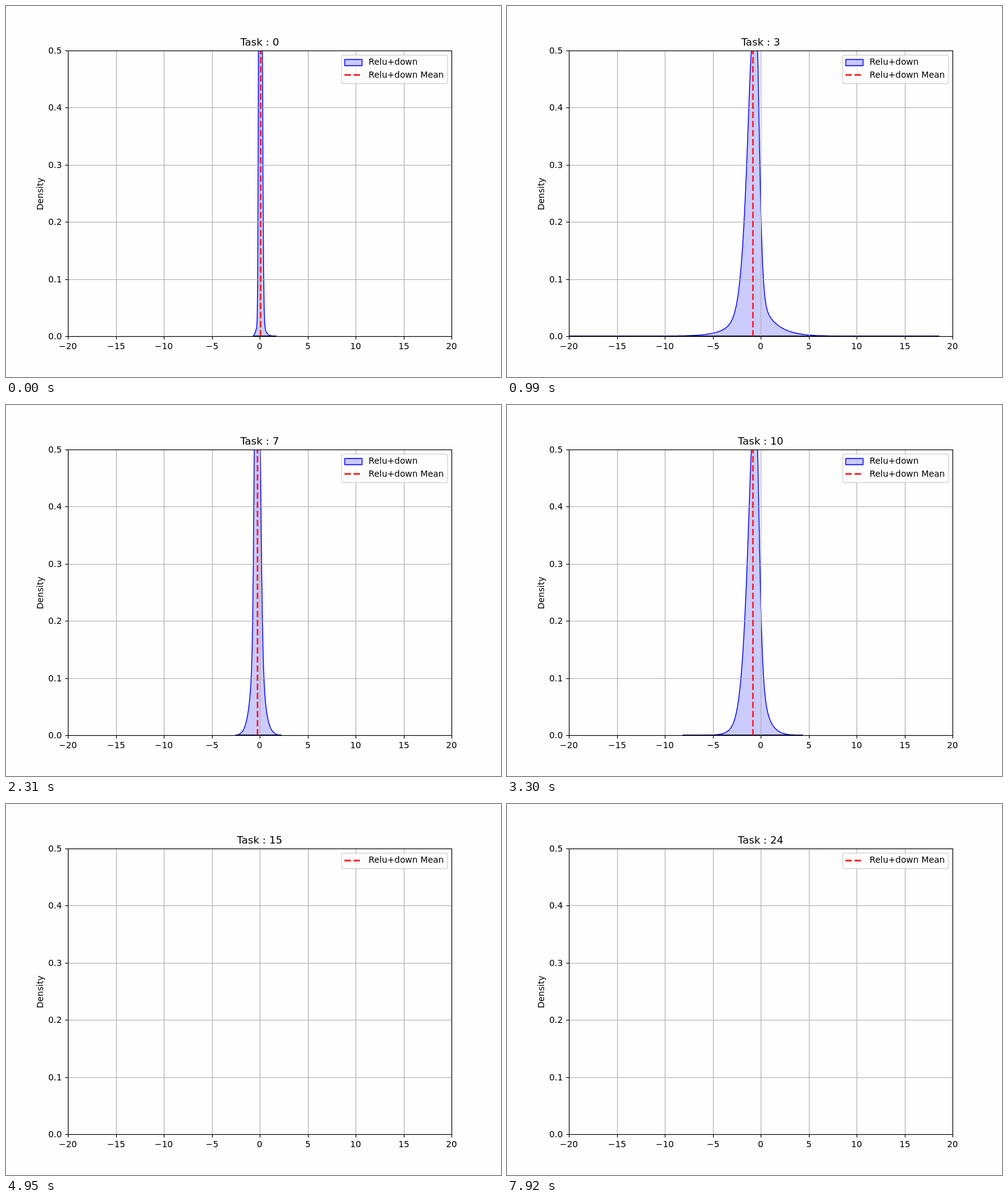
These frames come from a looping animation (800x600 px, 8000 ms). An HTML page with a canvas:

```html
<!DOCTYPE html>
<html lang="en">
<head>
<meta charset="utf-8">
<title>Density by task</title>
<style>
  html, body { margin: 0; width: 100%; height: 100%; overflow: hidden; background: #fefefe; }
  canvas { display: block; }
</style>
</head>
<body>
<canvas id="chart" width="800" height="600"></canvas>
<script>
const ctx = document.getElementById('chart').getContext('2d');
const LOOP = 8000, STEP = 330;
const LEFT = 100, RIGHT = 720, TOP = 72, BOTTOM = 534;
const THIN = 1.11, EDGE = 1.39, THICK = 2.78;
const BLUE = '#00f', FILL = 'rgba(0,0,255,.2)', RED = 'rgba(255,0,0,.8)';

// Mean and horizontal extent of each distribution; later tasks have none.
const tasks = [
  [411.5, 399, 437], [401.5, 90, 730], [404.5, 340, 456], [397.5, 90, 698], [403.5, 340, 456],
  [404.5, 335, 442], [405.5, 351, 443], [406.5, 371, 445], [402.5, 325, 455], [400.5, 313, 460],
  [397.5, 284, 478], [404.5, 350, 444], [406.5, 345, 445], [403.5, 339, 458], [405.5, 355, 446]
];

// One side of the bell, from where it leaves the top edge out to its far end:
// a compact core plus an exponential tail.
function flank(cross, end, core, tail, share) {
  const count = 60, span = Math.abs(end - cross);
  return Array.from({ length: count + 1 }, (_, i) => {
    const part = (i / count) ** 2, d = span * part;
    const bell = (1 - share) * Math.exp(-((d / core) ** 1.4)) + share * Math.exp(-d / tail);
    return [cross + (end - cross) * part, BOTTOM - (BOTTOM - TOP) * bell * (1 - part ** 2)];
  });
}

// The further the mean lies below zero, the wider and more skewed the bell.
function outline([mean, start, end]) {
  const shift = 411 - mean;
  const crossL = 407.2 - 1.5 * shift + .044 * shift ** 2;
  const crossR = 414 - .67 * shift;
  const tail = .5 * (end - start) ** .6;
  const share = Math.min(3.7 / tail, .1 + .07 * shift);
  return [
    ...flank(crossL, start, .8 + .06 * shift ** 2, tail, share).reverse(),
    [crossL, TOP - 20], [crossR, TOP - 20],
    ...flank(crossR, end, 1.6 + .28 * shift, tail, share)
  ];
}

function line(x1, y1, x2, y2, color, width, dash = []) {
  ctx.strokeStyle = color;
  ctx.lineWidth = width;
  ctx.setLineDash(dash);
  ctx.beginPath();
  ctx.moveTo(x1, y1);
  ctx.lineTo(x2, y2);
  ctx.stroke();
  ctx.setLineDash([]);
}

const redLine = (x1, y1, x2, y2) => line(x1, y1, x2, y2, RED, THICK, [10.28, 4.44]);

function label(text, x, y, align = 'center', size = 13.89) {
  ctx.font = `${size}px "DejaVu Sans", sans-serif`;
  ctx.textAlign = align;
  ctx.fillStyle = '#000';
  ctx.fillText(text, x, y);
}

function paint(fill, stroke, width) {
  ctx.fillStyle = fill;
  ctx.fill();
  ctx.strokeStyle = stroke;
  ctx.lineWidth = width;
  ctx.stroke();
}

const columns = Array.from({ length: 9 }, (_, i) => ({
  x: Math.round(LEFT + i * 77.5) + .5,
  text: String(i * 5 - 20).replace('-', '\u2212')
}));
const rows = Array.from({ length: 6 }, (_, i) => ({
  y: Math.round(BOTTOM - i * 92.4) + .5,
  text: (i / 10).toFixed(1)
}));

function drawBell(task) {
  const [, start, end] = task;
  ctx.beginPath();
  for (const [x, y] of outline(task)) ctx.lineTo(x, y);
  ctx.closePath();
  ctx.lineJoin = 'round';
  paint(FILL, BLUE, EDGE);
  ctx.lineJoin = 'miter';
  line(start, BOTTOM - .5, end, BOTTOM - .5, 'rgba(0,0,40,.8)', 1);
}

function drawLegend(hasData) {
  const meanY = hasData ? 111.5 : 91.5;
  ctx.beginPath();
  ctx.roundRect(542.5, 79.5, 171, hasData ? 46 : 25, 2.78);
  paint('rgba(254,254,254,.8)', 'rgba(204,204,204,.8)', EDGE);
  if (hasData) {
    ctx.beginPath();
    ctx.rect(547.5, 86.5, 28, 10);
    paint(FILL, BLUE, EDGE);
    label('Relu+down', 586, 95, 'left');
  }
  redLine(547, meanY, 575, meanY);
  label('Relu+down Mean', 586, hasData ? 116 : 95, 'left');
}

function draw(index) {
  const task = tasks[index];
  ctx.fillStyle = '#fefefe';
  ctx.fillRect(0, 0, 800, 600);

  ctx.save();
  ctx.beginPath();
  ctx.rect(LEFT, TOP, RIGHT - LEFT, BOTTOM - TOP);
  ctx.clip();
  if (task) drawBell(task);
  for (const { x } of columns) line(x, TOP, x, BOTTOM, '#b0b0b0', THIN);
  for (const { y } of rows) line(LEFT, y, RIGHT, y, '#b0b0b0', THIN);
  if (task) redLine(task[0], BOTTOM + .5, task[0], TOP);
  ctx.restore();

  for (const { x, text } of columns) {
    line(x, BOTTOM + .5, x, BOTTOM + 5.4, '#000', THIN);
    label(text, x - .5, 555);
  }
  for (const { y, text } of rows) {
    line(LEFT + .5, y, LEFT - 4.4, y, '#000', THIN);
    label(text, 90.3, y + 4.5, 'right');
  }
  ctx.strokeStyle = '#000';
  ctx.lineWidth = THIN;
  ctx.strokeRect(LEFT + .5, TOP + .5, RIGHT - LEFT, BOTTOM - TOP);

  ctx.save();
  ctx.translate(60, 304);
  ctx.rotate(-Math.PI / 2);
  label('Density', 0, 0);
  ctx.restore();

  label(`Task : ${index}`, 410, 64, 'center', 16.67);
  drawLegend(Boolean(task));
}

const start = performance.now();
function frame() {
  draw(Math.floor((performance.now() - start) % LOOP / STEP));
  requestAnimationFrame(frame);
}
frame();
</script>
</body>
</html>
```
